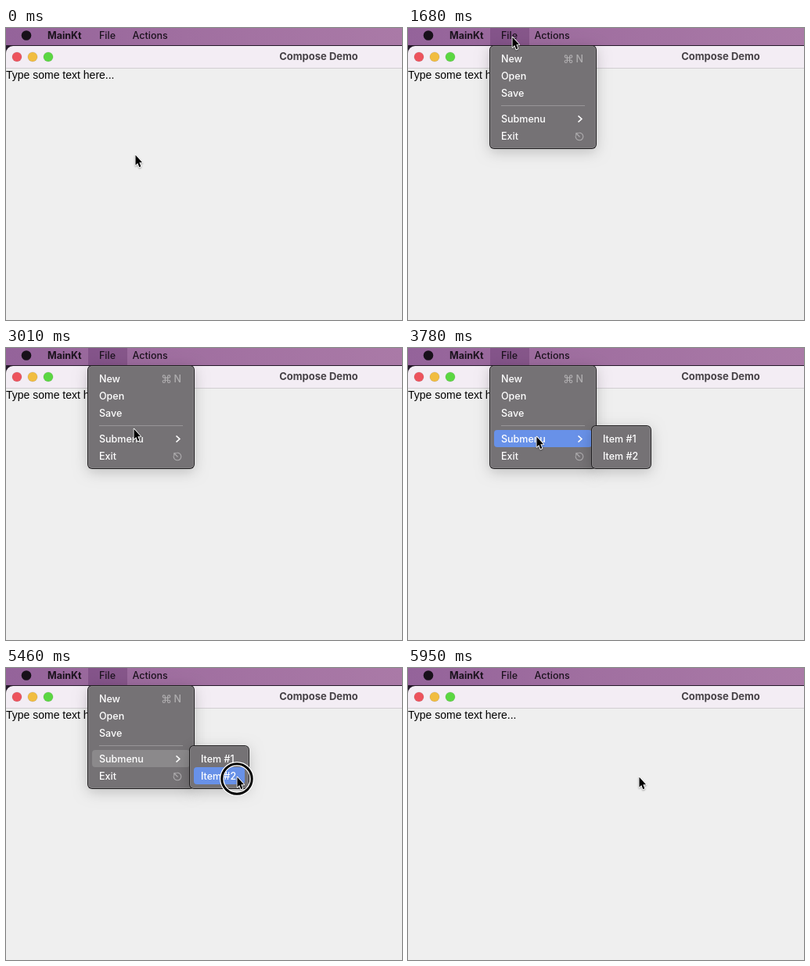
These frames come from a looping animation (506x374 px, 6650 ms). An HTML page with a canvas:

```html
<!DOCTYPE html>
<html lang="en">
<head>
<meta charset="utf-8">
<title>Menu bar demo</title>
<style>
html, body { margin: 0; width: 100%; height: 100%; overflow: hidden; background: #efefef; }
canvas { display: block; }
</style>
</head>
<body>
<canvas id="stage" width="506" height="374"></canvas>
<script>
const ctx = document.getElementById('stage').getContext('2d');
const LOOP = 6650, STEP = 70;
const UI = 'Inter, sans-serif';
const BLUE = '#6891e8', GREY = '#8b898b', DIM = '#b0aeb0';

// Pointer path: time, x, y
const PATH = [
  [0, 165, 163], [490, 135, 19], [630, 135, 19], [840, 131, 11], [1610, 131, 11],
  [1680, 133, 12], [1960, 141, 23], [2170, 141, 23], [2520, 160, 50], [2870, 163, 86],
  [3150, 162, 114], [3710, 162, 114], [4550, 288, 119], [5180, 295, 140], [LOOP, 295, 140]
];

const FILE_ITEMS = [['New', 28], ['Open', 50], ['Save', 72], ['Submenu', 105], ['Exit', 127]];
const SUB_ITEMS = [['Item #1', 105], ['Item #2', 127]];

// Speed at a key along one axis; zero where the pointer rests
function speedAt(i, axis) {
  const rests = (a, b) => !a || !b || (a[1] === b[1] && a[2] === b[2]);
  const prev = PATH[i - 1], key = PATH[i], next = PATH[i + 1];
  if (rests(prev, key) || rests(key, next)) return 0;
  return (next[axis] - prev[axis]) / (next[0] - prev[0]);
}

// Cubic Hermite interpolation between keys
function pointerAt(t) {
  const i = PATH.findIndex((key, n) => n && t <= key[0]);
  const a = PATH[i - 1], b = PATH[i];
  const span = b[0] - a[0], p = (t - a[0]) / span, q = 1 - p;
  const along = axis =>
    a[axis] * q * q * (1 + 2 * p) + b[axis] * p * p * (3 - 2 * p) +
    span * p * q * (q * speedAt(i - 1, axis) - p * speedAt(i, axis));
  return { x: along(1), y: along(2) };
}

function rect(x, y, w, h, color) {
  ctx.fillStyle = color;
  ctx.fillRect(x, y, w, h);
}

function rounded(x, y, w, h, r, color) {
  ctx.beginPath();
  ctx.roundRect(x, y, w, h, r);
  ctx.fillStyle = color;
  ctx.fill();
}

function disc(x, y, r, color) {
  ctx.beginPath();
  ctx.arc(x, y, r, 0, Math.PI * 2);
  ctx.fillStyle = color;
  ctx.fill();
}

function text(str, x, y, color, weight = 500, size = 12.5, family = UI, align = 'left') {
  ctx.font = `${weight} ${size}px ${family}`;
  ctx.textAlign = align;
  ctx.fillStyle = color;
  ctx.fillText(str, x, y);
}

function line(points, color, width) {
  ctx.beginPath();
  points.forEach(([x, y]) => ctx.lineTo(x, y));
  ctx.strokeStyle = color;
  ctx.lineWidth = width;
  ctx.stroke();
}

function drawMenuBar(active) {
  const g = ctx.createLinearGradient(0, 0, 506, 0);
  g.addColorStop(0, '#94639a');
  g.addColorStop(0.45, '#a06fa0');
  g.addColorStop(1, '#aa7aa7');
  rect(0, 0, 506, 22, g);
  if (active) rect(105, 0, 50, 22, 'rgba(65,20,75,.24)');
  disc(26, 9.5, 6.3, '#171019');
  text('MainKt', 53, 14, '#1b121d', 700);
  text('File', 119, 14, '#1b121d');
  text('Actions', 161.5, 14, '#1b121d');
}

function drawWindow() {
  rect(0, 22, 506, 14, '#25192a');
  rounded(0, 23, 520, 360, [9, 0, 0, 0], '#f3edf4');
  rect(0, 51, 506, 323, '#efefef');
  rect(0, 51, 506, 1, '#d2ced2');
  ['#ed535d', '#f1bd40', '#5bd742'].forEach((color, i) => {
    disc(14 + i * 20, 37, 6.1, color);
    ctx.strokeStyle = 'rgba(0,0,0,.12)';
    ctx.lineWidth = 0.8;
    ctx.stroke();
  });
  text('Compose Demo', 399.5, 41, '#474247', 700, 13, UI, 'center');
  text('Type some text here...', 0, 65, '#000', 400, 14, '"Liberation Sans", sans-serif');
}

function drawPanel(x, y, w, h) {
  ctx.save();
  ctx.shadowColor = 'rgba(0,0,0,.2)';
  ctx.shadowBlur = 17;
  ctx.shadowOffsetY = 4;
  rounded(x, y, w, h, 6, '#1f1d1f');
  ctx.restore();
  rounded(x + 1, y + 1, w - 2, h - 2, 5, '#918f91');
  rounded(x + 1.6, y + 1.6, w - 3.2, h - 3.2, 4.5, '#757275');
}

function drawItems(items, textX, boxX, boxW, colors) {
  for (const [label, y] of items) {
    if (colors[label]) rounded(boxX, y, boxW, 22, 4, colors[label]);
    text(label, textX, y + 16, '#fff');
  }
}

function drawCommandKey(x, y) {
  ctx.save();
  ctx.translate(x, y);
  ctx.strokeStyle = DIM;
  ctx.lineWidth = 1.1;
  for (let i = 0; i < 4; i++) {
    ctx.beginPath();
    ctx.moveTo(1.6, 3.2);
    ctx.arc(3.2, -3.2, 1.6, Math.PI, Math.PI / 2);
    ctx.stroke();
    ctx.rotate(Math.PI / 2);
  }
  ctx.restore();
}

function drawEscapeKey(x, y) {
  ctx.beginPath();
  ctx.arc(x, y, 4.8, -Math.PI * 0.55, Math.PI * 1.05);
  ctx.strokeStyle = DIM;
  ctx.lineWidth = 1.1;
  ctx.stroke();
  line([[x + 0.5, y + 0.5], [x - 4, y - 4]], DIM, 1.1);
  line([[x - 4.2, y - 1], [x - 4.2, y - 4.2], [x - 1, y - 4.2]], DIM, 1.1);
}

function drawMenus(t, tip) {
  const subOpen = t >= 3220;
  const inSub = subOpen && tip.x >= 238;
  const blink = t >= 5600 && t < 5670;
  const hovered = items => {
    const hit = items.find(([, y]) => tip.y >= y && tip.y < y + 22);
    return hit && !blink ? { [hit[0]]: BLUE } : {};
  };

  drawPanel(104, 22, 137, 133);
  drawItems(FILE_ITEMS, 119, 110, 125, inSub ? { Submenu: GREY } : hovered(FILE_ITEMS));
  rect(119, 99, 107, 1, '#989698');
  drawCommandKey(205, 39.7);
  text('N', 214.5, 44, DIM);
  line([[217.5, 112.5], [221.8, 116.5], [217.5, 120.5]], '#fff', 1.7);
  drawEscapeKey(219, 139);

  if (subOpen) {
    drawPanel(234, 99, 77, 56);
    drawItems(SUB_ITEMS, 249, 240, 65, inSub ? hovered(SUB_ITEMS) : {});
  }
}

function drawRing({ x, y }) {
  for (const [color, width] of [['#fff', 5.4], ['#000', 3]]) {
    ctx.beginPath();
    ctx.arc(x, y + 2, 19.2, 0, Math.PI * 2);
    ctx.strokeStyle = color;
    ctx.lineWidth = width;
    ctx.stroke();
  }
}

function drawPointer({ x, y }) {
  const arrow = new Path2D('M0 0V14L3.2 11L5.6 16.6L8 15.6L5.6 10.2H10Z');
  ctx.save();
  ctx.translate(Math.round(x) + 0.5, Math.round(y) - 0.3);
  ctx.scale(0.86, 0.94);
  ctx.lineJoin = 'round';
  ctx.shadowColor = 'rgba(0,0,0,.35)';
  ctx.shadowBlur = 2;
  ctx.shadowOffsetY = 1;
  ctx.strokeStyle = '#fff';
  ctx.lineWidth = 2;
  ctx.stroke(arrow);
  ctx.shadowColor = 'transparent';
  ctx.fillStyle = '#000';
  ctx.fill(arrow);
  ctx.restore();
}

function draw(now) {
  const t = Math.floor((now % LOOP) / STEP) * STEP;
  const tip = pointerAt(t);
  drawMenuBar(t >= 910 && t < 5880);
  drawWindow();
  if (t >= 980 && t < 5950) {
    ctx.globalAlpha = Math.min(1, (5950 - t) / 210);
    drawMenus(t, tip);
    ctx.globalAlpha = 1;
  }
  if ((t >= 910 && t < 1050) || (t >= 5390 && t < 5600)) drawRing(tip);
  drawPointer(tip);
}

const start = performance.now();
function tick() {
  draw(performance.now() - start);
  requestAnimationFrame(tick);
}
tick();
</script>
</body>
</html>
```
